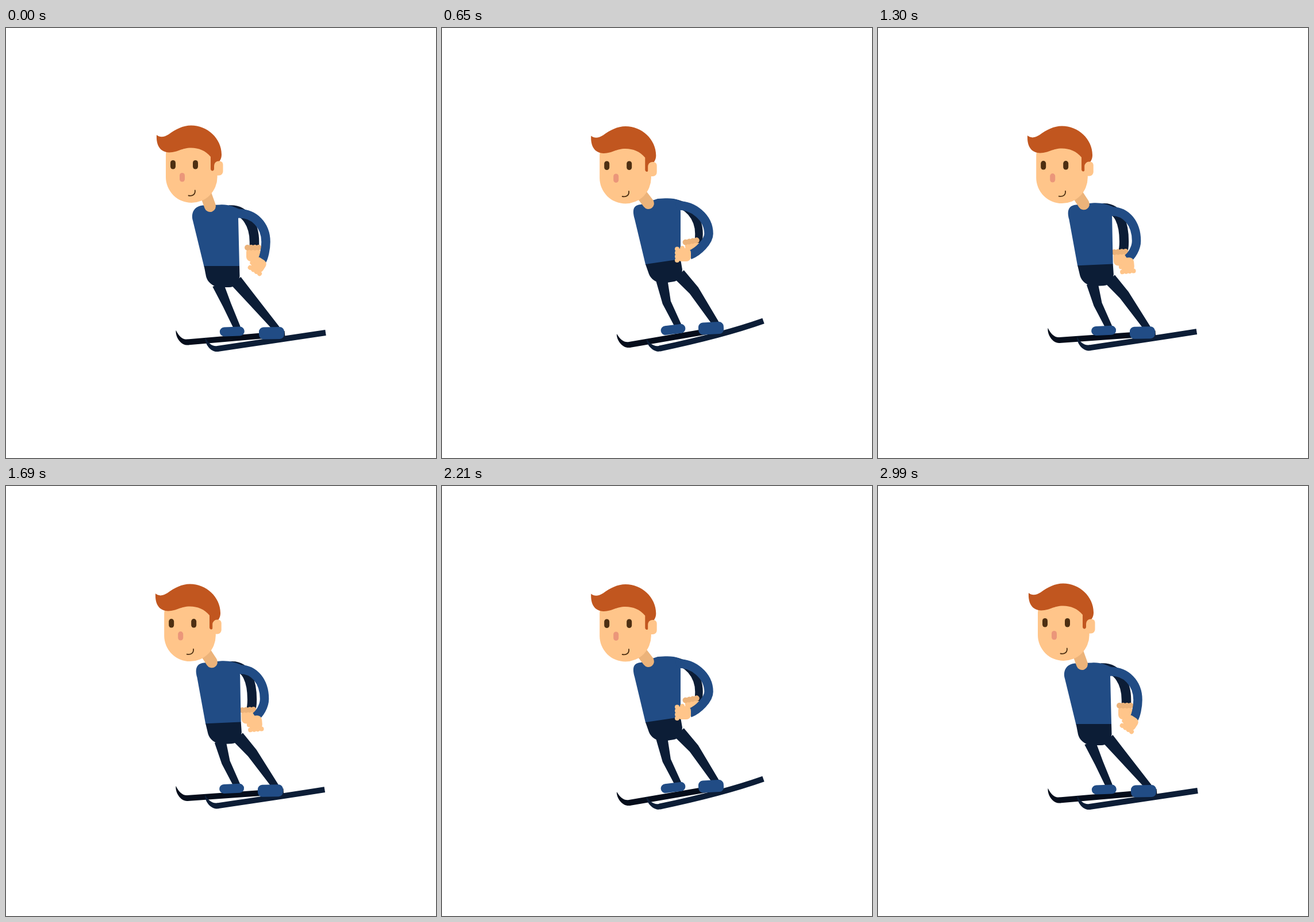
These frames come from a looping animation (748 by 748 pixels, 3120 ms). An HTML page with a canvas:

```html
<!DOCTYPE html>
<html lang="en">
<head>
<meta charset="utf-8">
<title>Skier</title>
<style>
html, body { margin: 0; width: 100%; height: 100%; overflow: hidden; background: #fff; }
canvas { display: block; width: 748px; height: 748px; }
</style>
</head>
<body>
<canvas id="stage" width="748" height="748"></canvas>
<script>
const ctx = document.getElementById('stage').getContext('2d');
const STEP = 130, RAD = Math.PI / 180;
const SKIN = '#ffc58a', TAN = '#ecb37a', HAIR = '#c1561f', BROWN = '#4d2f12';
const BLUE = '#214c85', NAVY = '#0c1d36', BLACK = '#050d1b';

// How far each motion has gone, from upright (0) to crouched (1).
let soft, quick, slow, swing, whirl;

function setPose(u) {
  soft = 1 - (1 - u) ** 1.5;
  quick = 1 - (1 - u) ** 6;
  slow = u ** 1.5;
  swing = Math.sin(Math.PI * u);
  whirl = Math.sin(2 * Math.PI * u);
}

// A joint: its upright place plus one or two eased shifts.
const at = (x, y, e, dx, dy, e2 = 0, dx2 = 0, dy2 = 0) =>
  [x + dx * e + dx2 * e2, y + dy * e + dy2 * e2];
const add = (p, x, y) => [p[0] + x, p[1] + y];
const mix = (p, q, fx, fy = fx) => [p[0] + (q[0] - p[0]) * fx, p[1] + (q[1] - p[1]) * fy];
const angle = (p, q) => Math.atan2(q[1] - p[1], q[0] - p[0]);

function trace(cmds, nums) {
  const n = nums.flat();
  let k = 0;
  ctx.beginPath();
  for (const c of cmds) {
    if (c === 'M') ctx.moveTo(n[k++], n[k++]);
    if (c === 'L') ctx.lineTo(n[k++], n[k++]);
    if (c === 'Q') ctx.quadraticCurveTo(n[k++], n[k++], n[k++], n[k++]);
    if (c === 'C') ctx.bezierCurveTo(n[k++], n[k++], n[k++], n[k++], n[k++], n[k++]);
  }
}

function fill(cmds, nums, color) {
  trace(cmds, nums);
  ctx.fillStyle = color;
  ctx.fill();
}

function line(cmds, nums, color, width, cap = 'butt') {
  trace(cmds, nums);
  ctx.strokeStyle = color;
  ctx.lineWidth = width;
  ctx.lineCap = cap;
  ctx.lineJoin = 'round';
  ctx.stroke();
}

function box(x, y, w, h, r, color) {
  ctx.fillStyle = color;
  ctx.beginPath();
  ctx.roundRect(x, y, w, h, r);
  ctx.fill();
}

function dot(x, y, r, color) {
  box(x - r, y - r, 2 * r, 2 * r, r, color);
}

function inside(origin, turn, paint) {
  ctx.save();
  ctx.translate(...origin);
  ctx.rotate(turn);
  paint();
  ctx.restore();
}

function ski(base, end, sag, color) {
  const len = Math.hypot(end[0] - base[0], end[1] - base[1]);
  inside(base, angle(base, end), () => {
    line('MQ', [0, 0, len * 0.6, sag, len, 0], color, 10);
    fill('MCLLLC', [-18.5, -22.5, -21, -11, -12, 5, 0, 5, 1, 5, 1, -5, 0, -5,
      -8, -5, -14, -11, -18.5, -22.5], color);
  });
}

function shoe(place, w, h, tilt) {
  inside(place, tilt * RAD, () => box(-w / 2, -h / 2, w, h, 8, BLUE));
}

// A tapering leg that bends at the knee.
function leg(hip, knee, foot, widths) {
  const joints = [hip, knee, foot];
  const turns = [angle(hip, knee), angle(hip, foot), angle(knee, foot)];
  const side = s => joints.map((p, i) =>
    add(p, -Math.sin(turns[i]) * s * widths[i] / 2, Math.cos(turns[i]) * s * widths[i] / 2));
  fill('MLLLLL', [...side(1), ...side(-1).reverse()].flat(), NAVY);
}

function arm(shoulder, elbow, wrist, color, width) {
  line('MCC', [
    shoulder, add(shoulder, 30, -2), add(elbow, 0, -28), elbow,
    add(elbow, 0, 13), mix(elbow, wrist, 0.55, 0.85), wrist
  ], color, width);
}

function hand(place, turn, color, r) {
  inside(place, turn * RAD, () => {
    box(-15, -11, 24, 23, 8, SKIN);
    dot(0, 12, 4, SKIN);
    for (let y = -9; y <= 11; y += 6.5) dot(9, y, r, color);
  });
}

function backArm() {
  const shoulder = at(388, 316.5, soft, 9, -11.5);
  const elbow = at(432, 372, soft, 15, -14, swing, -14, 6);
  const wrist = at(432, 382, soft, 11, -2, swing, -17, 18);
  arm(shoulder, elbow, wrist, NAVY, 16.5 - 3 * slow);
  hand(add(wrist, -3 - 6 * soft, 9 - 9 * soft), -90 - 10 * soft, TAN, 5);
}

function frontArm() {
  const shoulder = at(402, 323, soft, 5, -14);
  const elbow = at(452, 372, soft, 12, -14, swing, -10, 4);
  const wrist = at(445.5, 404, quick, -14.5, -9, swing, -2, 7);
  const turn = 123 + 57 * soft - 57 * whirl;
  arm(shoulder, elbow, wrist, BLUE, 15.5);
  hand(add(wrist, 13 * Math.cos(turn * RAD), 13 * Math.sin(turn * RAD)), turn, SKIN, 4);
}

function lowerBody(hipPoint) {
  const backShoe = at(393.3, 528, slow, 11, -1.5, quick, -2.3, -2);
  const frontShoe = at(462, 530.7, slow, 10, -8.4, quick, -4, 0);
  const backHip = hipPoint(24, 32), backFoot = add(backShoe, 9, -6);
  const frontHip = hipPoint(55.5, 26), frontFoot = add(frontShoe, 9, -7);

  ski(at(316, 546.5, slow, 12, 10.5, quick, -2, -6), at(485, 532, slow, 8, -9, quick, -4, 0), 0, BLACK);
  leg(backHip, add(mix(backHip, backFoot, 0.47), -5 * quick, quick), backFoot, [20, 15, 12]);
  shoe(backShoe, 43, 16, -2 - 5 * slow);

  ski(at(368, 558, slow, 13, 2, quick, -2, -2.5), at(556, 530, slow, 6, -20.5, quick, -3, 0), 6 * slow, NAVY);
  leg(frontHip, add(mix(frontHip, frontFoot, 0.32), 5 * quick, 0), frontFoot, [22, 18.5, 12]);
  shoe(frontShoe, 44, 21, -1 - 2 * slow);
}

function torso(hip, tilt, hipPoint) {
  const side = at(325, 335, quick, 10, -3);
  const collar = at(343, 308.5, quick, 3, -1.5);
  const back = at(372, 307.5, soft, 3, -10.5);
  const shoulder = at(408, 316, soft, 6, -16);
  const armpit = at(404, 330, soft, 11, -10);
  fill('MLCLCLL', [
    hipPoint(0, 1), side, add(side, -4, -15), add(collar, -14, 1), collar,
    back, add(back, 15, -1), add(shoulder, -12, -5), shoulder, armpit, hipPoint(61.5, 1)
  ], BLUE);
  inside(hip, tilt, () => fill('MLLCLC', [
    0, 0, 61.5, 0, 62, 18, 60, 30, 53, 37, 43.5, 37,
    27.5, 37, 14.5, 36, 5.5, 27, 3.5, 18
  ], NAVY));
  line('ML', [at(346, 285, quick, -3.5, -1.5), at(355, 310, quick, 4, -5)], TAN, 20, 'round');
}

function head() {
  const face = at(0, 0, quick, -3.8, 1.5);
  inside(face, 0, () => box(278, 190, 89.6, 114, [30, 30, 44.8, 44.8], SKIN));
  inside(at(0, 0, quick, -2.7, 1.5), 0, () => fill('MCCCCCLCCC', [
    262, 186, 268, 191, 275, 190, 283, 185,
    295, 176, 308, 169.5, 322, 169.5,
    350, 169.5, 375, 192, 375, 220,
    375, 234, 364, 236, 362, 245,
    362, 249.5, 356, 249.5, 356, 245,
    356, 224, 347, 213, 335, 208.5, 322, 208.5,
    305, 208.5, 300, 216, 284, 216.5,
    268, 216, 261, 204, 262, 186
  ], HAIR));
  inside(face, 0, () => {
    box(362, 231.5, 15.5, 25, [8, 6, 7, 4], SKIN);
    for (const x of [286, 325]) box(x, 230, 9, 15.5, 4.5, BROWN);
    box(302, 252, 9, 15.5, 4.5, '#eb967a');
    line('MC', [317.5, 291.5, 325, 293, 329.5, 289, 328.8, 282.5], BROWN, 1.8, 'round');
  });
}

function draw() {
  ctx.fillStyle = '#fff';
  ctx.fillRect(0, 0, 748, 748);

  const hip = at(344.5, 414, soft, 9.5, -3);
  const tilt = -8.3 * RAD * soft;
  const cos = Math.cos(tilt), sin = Math.sin(tilt);
  const hipPoint = (x, y) => add(hip, x * cos - y * sin, x * sin + y * cos);

  backArm();
  lowerBody(hipPoint);
  torso(hip, tilt, hipPoint);
  head();
  frontArm();
}

function tick(now) {
  // Twelve steps: down, a pause, up, a pause.
  const n = Math.floor(now / STEP) % 12;
  setPose((n < 6 ? n : 11 - n) / 5);
  draw();
  requestAnimationFrame(tick);
}

tick(0);
</script>
</body>
</html>
```
